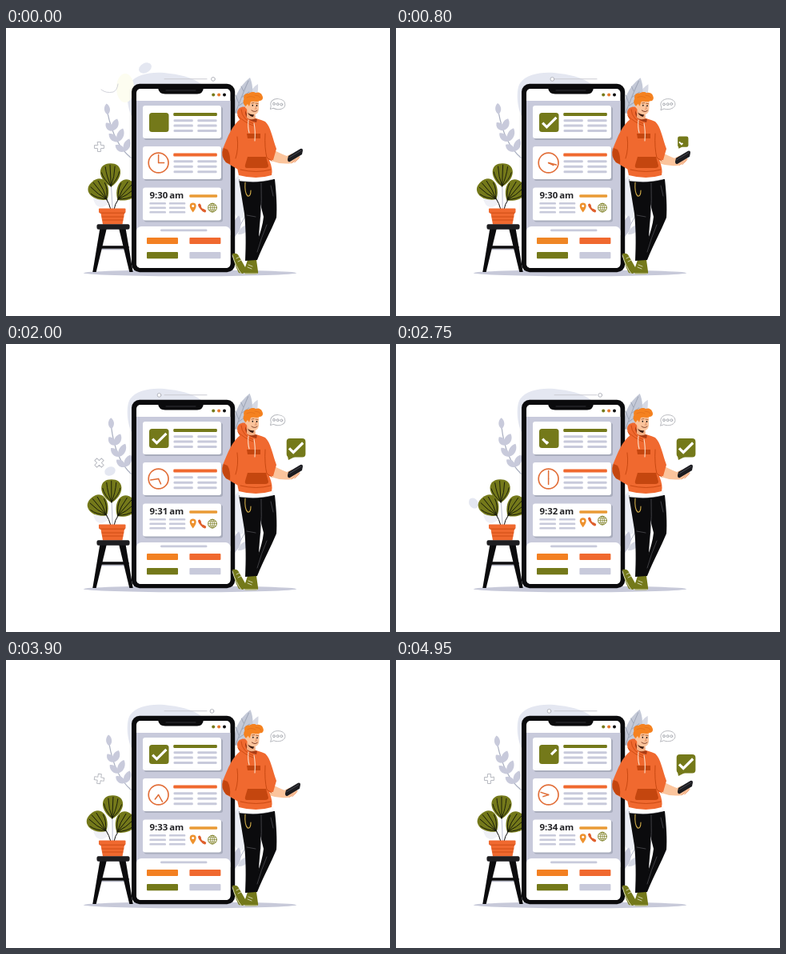
An HTML page with a canvas for the animation above (5 s loop, 480x360 px).

```html
<!DOCTYPE html>
<html lang="en">
<head>
<meta charset="utf-8">
<title>Daily planner</title>
<style>
html, body { margin: 0; width: 100%; height: 100%; overflow: hidden; background: #fff; }
canvas { display: block; width: 480px; height: 360px; }
</style>
</head>
<body>
<canvas id="stage" width="480" height="360"></canvas>
<script>
const ctx = document.getElementById('stage').getContext('2d');
const LOOP = 5000;
const INK = '#0b0b0d', ORANGE = '#f0692f', RUST = '#c4460f', OLIVE = '#74791a',
  LILAC = '#c8cadb', MIST = '#e4e7f1', AMBER = '#e99a35', SKIN = '#fbc49c', HAIR = '#f58220';

const clamp = v => Math.max(0, Math.min(1, v));
const ease = v => v * v * (3 - 2 * v);
const ramp = (t, a, b) => ease(clamp((t - a) / (b - a)));

// Eased interpolation through [time, value] pairs
function track(t, ...keys) {
  let value = keys[0][1];
  for (let i = 1; i < keys.length; i++) {
    const [a, from] = keys[i - 1], [b, to] = keys[i];
    if (t >= a) value = from + (to - from) * ramp(t, a, b);
  }
  return value;
}

function shape(d, fill, stroke, width = 1) {
  const p = new Path2D(d);
  if (fill) { ctx.fillStyle = fill; ctx.fill(p); }
  if (stroke) { ctx.strokeStyle = stroke; ctx.lineWidth = width; ctx.stroke(p); }
}
const line = (d, color, width) => shape(d, null, color, width);

function box(x, y, w, h, r, fill) {
  ctx.fillStyle = fill;
  ctx.beginPath();
  ctx.roundRect(x, y, w, h, r);
  ctx.fill();
}

function oval(x, y, rx, ry, fill, stroke, width = 1, turn = 0) {
  ctx.beginPath();
  ctx.ellipse(x, y, rx, ry, turn, 0, Math.PI * 2);
  if (fill) { ctx.fillStyle = fill; ctx.fill(); }
  if (stroke) { ctx.strokeStyle = stroke; ctx.lineWidth = width; ctx.stroke(); }
}

function at(x, y, turn, scale, draw) {
  ctx.save();
  ctx.translate(x, y);
  ctx.rotate(turn);
  ctx.scale(scale, scale);
  draw();
  ctx.restore();
}

// Check mark visible between two fractions of its length
function check(from, to) {
  if (to <= from) return;
  const bend = .32;
  const mix = (a, b, f) => [a[0] + (b[0] - a[0]) * f, a[1] + (b[1] - a[1]) * f];
  const start = [-8.6, .6], elbow = [-3.4, 5.8], end = [8.6, -6.2];
  const point = f => f < bend ? mix(start, elbow, f / bend) : mix(elbow, end, (f - bend) / (1 - bend));
  ctx.beginPath();
  ctx.moveTo(...point(from));
  if (from < bend && to > bend) ctx.lineTo(...elbow);
  ctx.lineTo(...point(to));
  ctx.strokeStyle = '#fff';
  ctx.lineWidth = 3.2;
  ctx.lineCap = 'butt';
  ctx.lineJoin = 'miter';
  ctx.stroke();
  ctx.lineCap = ctx.lineJoin = 'round';
}

function leaf(x, y, turn, length, width, color) {
  at(x, y, turn, 1, () => {
    shape(`M0 0C${-width} ${-length * .3} ${-width * .7} ${-length * .8} 0 ${-length}` +
      `C${width * .7} ${-length * .8} ${width} ${-length * .3} 0 0`, color);
  });
}

function backdrop(t) {
  shape('M163 118C151 108 149 78 155 69C164 56 187 54 205 57C222 59 236 63 248 73L251 118Z', MIST);
  oval(293, 211, 11, 27, '#eceef5');
  oval(119, 211, 10, 13, '#eff0f6');
  const intro = 1 - ramp(t, 20, 280);
  if (intro > 0) {
    ctx.globalAlpha = intro;
    oval(149, 75, 11, 18, '#fdfdf0');
    oval(174, 50, 8.5, 6, MIST, null, 1, -.5);
    line('M119 77Q125 82 134 80Q139 78 140 70', '#d3d4db', 1);
    ctx.globalAlpha = 1;
  }
  const drift = ramp(t, 1700, 2000) * (1 - ramp(t, 3100, 3450));
  if (drift > 0) {
    ctx.globalAlpha = drift;
    oval(track(t, [1700, 142], [2000, 130], [2750, 97], [3450, 108]),
      track(t, [1700, 150], [2000, 159], [2750, 199], [3450, 211]), 7, 5.5, MIST, null, 1,
      track(t, [2000, -.4], [2750, 1]));
    ctx.globalAlpha = 1;
  }
  line('M198 63.7H251', '#cbccd2', 1.1);
  const knob = track(t, [30, 259], [900, 193], [1200, 191.5], [2200, 191.5], [2820, 257.5],
    [4250, 257.5], [4850, 191.5]);
  oval(knob, 63.9, 2.4, 2.4, '#fff', '#b3b5bd', 1);
  oval(230, 306.3, 133, 3.9, '#c7c9d9');

  const hidden = Math.max(ramp(t, 500, 700) * (1 - ramp(t, 900, 1150)),
    ramp(t, 2450, 2650) * (1 - ramp(t, 2850, 3150)));
  if (hidden < .98) {
    const turn = track(t, [1500, 0], [2000, Math.PI / 4], [2450, Math.PI / 2],
      [3500, Math.PI / 2], [3900, 1.72], [4400, Math.PI / 2]);
    at(116.5, 148.5, turn, 1 - hidden, () =>
      shape('M-2 -6H2V-2H6V2H2V6H-2V2H-6V-2H-2Z', '#fff', '#b9bbc2', 1));
  }
}

function branch(t) {
  const sway = -.01 - .045 * Math.cos(t / LOOP * Math.PI * 2);
  at(156, 162, sway, 1, () => {
    line('M0 0Q-20 -18 -26 -58', '#a9afc0', 1.2);
    leaf(-25.8, -55, -.06, 14, 5.5, LILAC);
    for (const [u, right, left] of [[.2, 17, 14], [.45, 18, 15], [.68, 16, 13]]) {
      const x = -40 * u * (1 - u) - 26 * u * u, y = -36 * u * (1 - u) - 58 * u * u;
      leaf(x, y, .42, right, 6.5, LILAC);
      leaf(x, y, -1 + u * .5, left, 6, LILAC);
    }
  });
}

function rightLeaves(t) {
  at(285, 106, .012 * Math.sin(t / 480), 1, () => {
    shape('M12 0C15 -18 20 -30 30 -36C31 -19 24 -5 12 0Z', '#d6d9e4');
    shape('M0 0C-1 -18 5 -32 20 -44C26 -30 24 -12 8 2Z', '#c4c9d7');
    line('M2 0Q10 -22 18 -40M6 -12L2 -22M9 -19L19 -26M12 -27L9 -33M6 -9L17 -16', '#9fa7b8', 1);
  });
  line('M285 262Q292 248 299 235', '#b7bccb', 1);
  leaf(286, 260, .2, 26, 7.5, LILAC);
  leaf(290, 258, .9, 20, 6, '#d4d7e3');
}

function plantLeaf(x, y, turn) {
  at(x, y, turn, 1, () => {
    shape('M0 15C-6 12 -13 4 -12.6 -4C-12 -11 -7 -14 0 -14C7 -14 12 -11 12.6 -4C13 4 6 12 0 15Z', OLIVE);
    line('M0 15V-12M0 14Q-5 3 -6 -10M0 14Q5 3 6 -10M0 14Q-9 6 -11 -3M0 14Q9 6 11 -3', '#16180a', .9);
  });
}

function stool() {
  line('M116 274H152', INK, 3.4);
  line('M118 276.6H150', '#aeb1c0', 1.2);
  for (const side of [-1, 1]) {
    ctx.save();
    ctx.translate(133.5, 0);
    ctx.scale(side, 1);
    shape('M7.5 250H16L25.2 305H20.8Z', INK);
    ctx.restore();
  }
  box(113.5, 245.3, 41, 6.5, 2, '#1d1d20');
}

function plant(t) {
  const s = -Math.cos((t + 300) / 3000 * Math.PI * 2);
  line(`M133 227Q${133 + s * .5} 213 ${132 + s} 194`, '#c4c7d6', 1.2);
  line('M131 227Q129 219 125 213M135 227Q136 220 140 215', INK, 1);
  plantLeaf(132 + 1.7 * s, 183.3, s * .06);
  plantLeaf(116 - s, 202.8, -.7 - s * .03);
  plantLeaf(149 - s, 203.8, .72 - s * .04);
  shape('M118 229H148.5L145.5 245.5H121Z', ORANGE);
  box(116, 225.5, 33.5, 5.5, 1, ORANGE);
  line('M117.5 231.2H148.5M120 236H147M121 240H146', RUST, .8);
  stool();
}

function bars(x, y, width, color, height = 3) {
  for (const dy of y) box(x, dy, width, height, 1.2, color);
}

function clock(t) {
  oval(190.6, 168.5, 12.4, 12.4, '#fff', '#e2703b', 1.7);
  const hour = Math.PI / 2 + t / 2750 * Math.PI / 2;
  const minute = t / 2750 * Math.PI * 2;
  for (const [angle, length] of [[hour, 7], [minute, 10]]) {
    ctx.beginPath();
    ctx.moveTo(190.6, 168.5);
    ctx.lineTo(190.6 + Math.sin(angle) * length, 168.5 - Math.cos(angle) * length);
    ctx.strokeStyle = '#df6b34';
    ctx.lineWidth = 1.5;
    ctx.stroke();
  }
}

function icons(t) {
  const phase = (t + 1650) % 2200;
  const offset = phase > 1100 ? phase - 2200 : phase;
  const lift = centre => -4 * (1 - ramp(Math.abs(offset - centre), 0, 220));
  at(233.7, 224.5 + lift(-140), 0, 1, () => {
    shape('M0 6C-2 3 -4 1 -4 -2A4 4 0 0 1 4 -2C4 1 2 3 0 6Z', '#ee922e');
    oval(0, -2, 1.5, 1.5, '#fff');
  });
  at(245, 224.8 + lift(-70), 0, 1, () => {
    line('M-3 -3Q-1.5 2 3 3.8', '#df602c', 2.4);
    line('M-3.3 -3.6L-2.5 -1.7M1.5 3L3.5 4', '#df602c', 3.3);
  });
  at(258, 224.6 + lift(0), 0, 1, () => {
    oval(0, 0, 5.4, 5.4, '#fff', '#84862e', 1);
    oval(0, 0, 2.5, 5.4, null, '#84862e', .8);
    line('M-5 0H5M0 -5V5M-4.5 -2.7H4.5M-4.5 2.7H4.5', '#84862e', .7);
  });
}

function phone(t) {
  box(157, 69.7, 129.2, 235.5, 10, INK);
  box(163, 76, 117.5, 224, 5, '#fff');
  box(163, 91, 117.5, 168, 0, LILAC);
  shape('M190 75H247Q246 82.5 239 82.5H199Q191 82.5 190 75Z', INK);
  line('M200 78H237', '#303036', 1);
  [OLIVE, '#e4782d', INK].forEach((color, i) => oval(259.2 + i * 6.9, 83.5, 2, 2, color));
  for (const y of [97, 148, 199.5]) {
    box(172.5, y + 1.5, 98.5, 41.5, 3, '#a9adbd');
    box(171, y, 98, 41, 3, '#fff');
  }

  box(179, 106, 24.5, 24, 3.5, OLIVE);
  const phase = t % 2500;
  at(191.8, 118, 0, 1, () => check(ramp(phase, 2350, 2520), ramp(phase, 100, 440)));
  bars(209.3, [106], 54.5, OLIVE, 4);
  for (const x of [209.5, 239.3]) {
    bars(x, [114.2, 120.6, 127], 24.3, LILAC);
    bars(x, [165.2, 171.7, 178.3], 24.3, LILAC);
  }
  clock(t);
  bars(209.3, [156.5], 54.5, ORANGE, 4);

  ctx.fillStyle = '#232326';
  ctx.font = 'bold 11.4px "Open Sans", sans-serif';
  ctx.textAlign = 'left';
  ctx.fillText('9:' + (30 + Math.floor(t / 1050)), 179.5, 213.2);
  ctx.textAlign = 'right';
  ctx.fillText('am', 222.2, 213.2);
  bars(229.3, [208.3], 34.8, AMBER, 3.4);
  bars(179.3, [218, 223.5, 229], 20.7, LILAC, 2.6);
  bars(203.8, [218, 223.5, 229], 20.5, LILAC, 2.6);
  icons(t);

  box(163, 248, 117.5, 52, 6, '#fff');
  box(193, 251.5, 58.5, 2.8, 1.4, LILAC);
  const warm = Math.exp(-(((t - 1250) / 420) ** 2));
  box(176, 262, 39, 8, 1, `rgb(${243 - 13 * warm},${128 + 20 * warm},${34 + 9 * warm})`);
  box(229.4, 262, 39, 8, 1, ORANGE);
  box(176, 280, 39, 8.2, 1, OLIVE);
  box(229.4, 280, 39, 8.2, 1, LILAC);
}

function legs() {
  shape('M297 286H303V297H298Z', '#fff');
  shape('M283 282C287 281 290 282 291 285L299 299Q301 305 296 307L291 306Q284 293 283 282Z', OLIVE);
  line('M283 284Q287 298 294 307', '#d9dbbe', 1);
  shape('M302 290H313L315 304Q316 307.5 312 307.5H299Q296 304 299 299Z', OLIVE);
  line('M298 307H314', '#d9dbbe', 1.1);
  line('M303 296L308 298M302 299L307 301M288 288L292 286M290 292L294 290', '#e7e8d5', .8);
  shape('M310 189H336C338 207 339 225 338 237C331 254 322 270 314 290L305 290C311 272 320 256 322 236Z', INK);
  shape('M291 189H318L318 236C316 254 316 272 313 290L299 291C300 270 300 252 298 232Z', INK);
  line('M319 194Q320 216 318 236M301 234L312 236M331 197L334 210M326 246Q319 262 314 280', '#57575c', .7);
  line('M299 193Q298 206 302 210Q306 211 306 203', '#d6b04a', 1.1);
}

function arm(lowered) {
  at(-3 * lowered, 2.7 * lowered, 0, 1, () => {
    shape('M332 151Q343 157 351 160L357 157L363 158L368 161Q364 167 357 169Q344 171 331 166Z', SKIN);
    shape('M353 160L368 151Q371 150 371 153L370 158L355 167Q352 168 352 164Z', '#1c1c20');
    line('M354 162L369 153', '#515158', .8);
    line('M357 169L362 164M361 168L366 162', '#e99a70', .8);
  });
}

function head(lowered) {
  at(308, 112, lowered * .035, 1, () => {
    shape('M-7 -9H3L4 1Q-3 4 -7 0Z', '#f3af83');
    shape('M-7 -23C-2 -27 6 -25 8 -21L8 -10Q7 -4 2 -4C-4 -4 -8 -9 -8 -15Z', SKIN);
    oval(-7, -14, 2.1, 2.8, SKIN);
    shape('M-8.5 -14C-12 -17 -12 -21 -10.5 -23C-12 -28 -8 -31 -5 -30C-1 -33 3 -32 4 -31C9 -33 12 -29 12 -28C14 -25 13 -21 9 -21C5 -19 2 -21 -2 -20L-4 -14L-6 -17Z', HAIR);
    line('M-7 -25Q-2 -28 3 -25M3 -28Q8 -28 10 -25', '#e16d1c', .7);
    oval(.3, -15.2, .8, 1, INK);
    oval(5.5, -15, .8, 1, INK);
    line('M-1 -18L2 -18.5M4 -18L7 -17.5', '#9d4d19', .8);
    line('M4 -14L5 -11L3 -11', '#d98255', .8);
    line('M-1 -9Q3 -6 6 -9', '#74331c', .9);
    shape('M-6 -6Q-2 -3 2 -4L1 -1Q-3 -1 -6 -6Z', '#3a1a10');
  });
}

function person(t) {
  const lowered = Math.max(ramp(t, 120, 500) * (1 - ramp(t, 880, 1180)),
    ramp(t, 3200, 3550) * (1 - ramp(t, 4250, 4550)));
  legs();
  shape('M291 183H333L334 189Q315 194 292 191Z', '#fff', '#e9e9ee', .5);
  arm(lowered);
  shape('M293 114C283 121 277 136 271 151Q268 160 275 168L292 178L305 160L304 120Z', ORANGE);
  shape('M272 150Q268 160 275 168L280 170Q281 159 277 152Z', RUST);
  shape('M290 117C297 111 314 112 324 117C331 123 333 138 338 151L334 165L329 165Q334 177 332 184Q313 190 291 184C287 171 290 152 290 140Z', ORANGE);
  line('M324 132Q323 150 326 162L332 166M289 136Q291 151 287 163M293 177Q313 182 331 177', RUST, .9);
  shape('M289 105C290 98 298 97 302 100C304 108 310 113 315 114Q318 120 311 122C300 121 289 117 289 105Z', ORANGE);
  line('M294 102Q295 115 310 120M290 110Q298 118 309 122', RUST, .8);
  shape('M299 103Q301 111 314 114L313 118Q298 115 299 103Z', '#a93c15');
  head(lowered);
  shape('M301 132H318V138H302Z', RUST);
  shape('M302 161H325L328 172Q328 175 324 175H301Q298 175 299 171Z', RUST);
  line('M303 115Q302 124 304 131M310 119Q312 129 311 141', '#f9dfc9', 1.1);
}

function chat(t) {
  at(339.7, 95.4, .09 * Math.sin((t - 1700) / 2200 * Math.PI * 2), .97, () => {
    shape('M-8.5 3C-11 -3 -6 -7 0 -7C6 -7 9.5 -4 9.5 0C9.5 4 5 6.5 0 6.5Q-3 6.5 -5 5.5L-9 7Z', '#fff', '#b6b8bd', 1);
    for (const x of [-4.8, 0, 4.8]) oval(x, -.2, 1.5, 1.5, '#fff', '#9da0a7', .9);
  });
}

function badge(t) {
  const first = ramp(t, 590, 980) * (1 - ramp(t, 2920, 3260));
  const scale = Math.max(first, ramp(t, 4380, 4760));
  if (scale < .02) return;
  const drawn = t < 3300 ? ramp(t, 580, 1040) : ramp(t, 4400, 4850);
  at(354, 158, 0, scale, () => {
    box(-3.3, -40, 23.7, 23.5, 4, OLIVE);
    shape('M-2.5 -20L-1 -13L7 -17Z', OLIVE);
    at(8.6, -28.3, 0, 1, () => check(0, drawn));
  });
}

function render(now) {
  const t = now % LOOP;
  ctx.fillStyle = '#fff';
  ctx.fillRect(0, 0, 480, 360);
  ctx.lineCap = ctx.lineJoin = 'round';
  backdrop(t);
  branch(t);
  rightLeaves(t);
  plant(t);
  phone(t);
  person(t);
  chat(t);
  badge(t);
}

const start = performance.now();
function tick() {
  render(performance.now() - start);
  requestAnimationFrame(tick);
}
tick();
</script>
</body>
</html>
```
